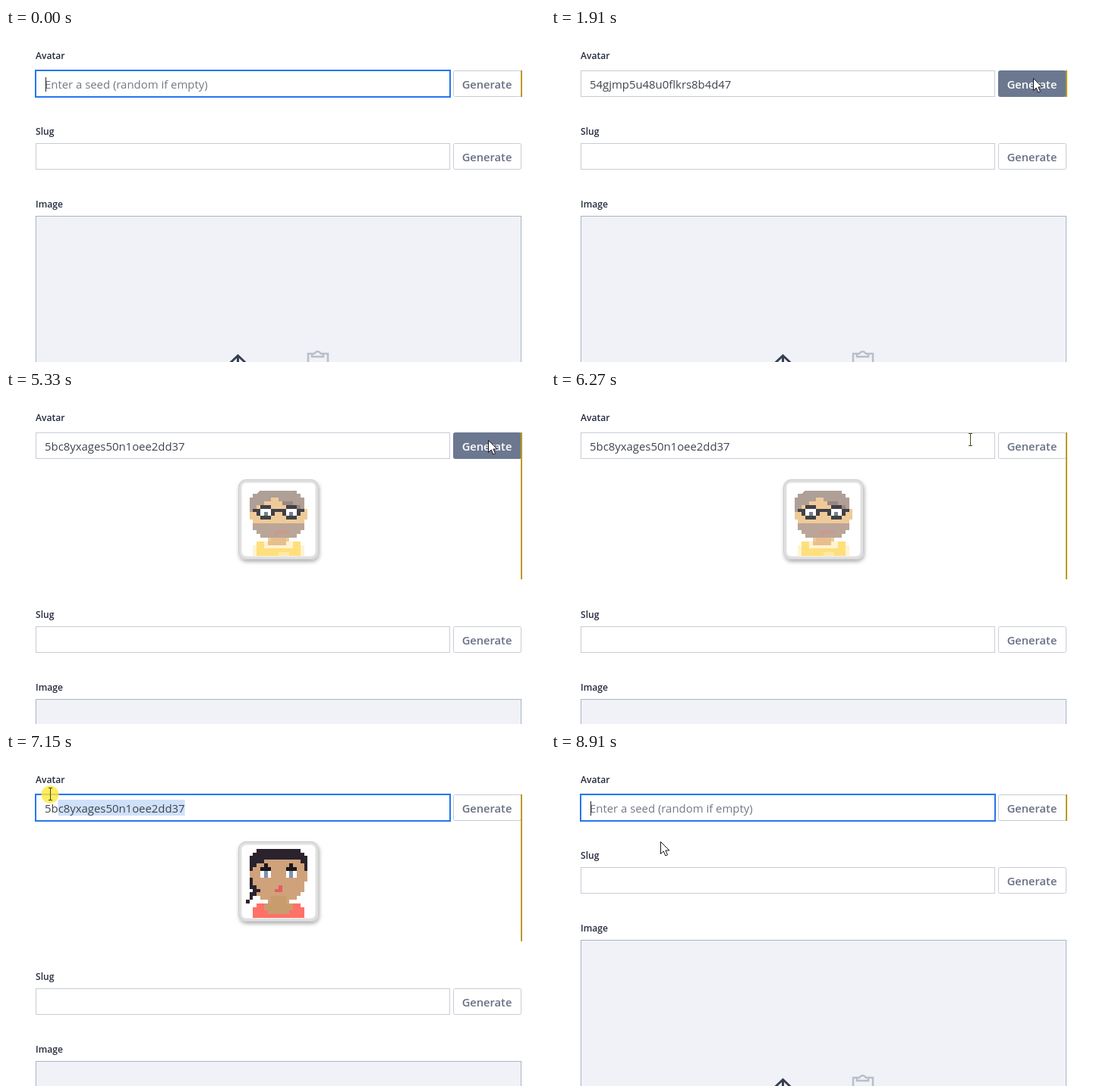
Write an HTML page that moves like this. It is 710 px wide and 441 px high and loops after 9.04 s.

```html
<!DOCTYPE html>
<html lang="en">
<head>
<meta charset="utf-8">
<title>Avatar field</title>
<style>
html, body { margin: 0; width: 100%; height: 100%; overflow: hidden; background: #fff; }
svg { display: block; font-family: "Open Sans", "Noto Sans", sans-serif; }
.label { font-size: 12.1px; font-weight: 600; fill: #262b3f; }
.btn { font-size: 14.7px; font-weight: 600; fill: #697084; }
.seed { font-size: 14.9px; }
.box { fill: #fff; stroke: #c8ccd6; }
.pixels { shape-rendering: crispEdges; }
</style>
</head>
<body>
<svg width="710" height="441" viewBox="0 0 710 441">
  <defs>
    <filter id="shadow" x="-20%" y="-20%" width="140%" height="140%">
      <feDropShadow dx="1" dy="3" stdDeviation="2.5" flood-color="#000" flood-opacity=".3"/>
    </filter>
  </defs>
  <text class="label" x="39" y="41">Avatar</text>
  <rect id="field" class="box" x="39.5" y="56.5" width="545" height="34"/>
  <rect id="selection" y="63" height="21" fill="#cfe1fa"/>
  <text id="seed" class="seed" x="51" y="80"></text>
  <path id="caret" d="M52.5 65v19" stroke="#222"/>
  <rect id="button" class="box" x="589.5" y="56.5" width="89" height="34" rx="2"/>
  <text id="buttonText" class="btn" x="633.5" y="80" text-anchor="middle">Generate</text>
  <rect id="bar" x="678" y="56" width="2" fill="#bd9a20"/>

  <g id="card">
    <rect x="306" y="118" width="106" height="106" rx="10" fill="#e0e0e0" filter="url(#shadow)"/>
    <rect x="306.5" y="118.5" width="105" height="105" rx="10" fill="none" stroke="#cbcbcb"/>
    <rect x="310.5" y="122.5" width="97" height="97" rx="6" fill="#fff"/>
    <g id="face" class="pixels" transform="translate(311 123) scale(4.8)"></g>
  </g>

  <g id="rest">
    <text class="label" x="39" y="141">Slug</text>
    <rect class="box" x="39.5" y="152.5" width="545" height="34"/>
    <rect class="box" x="589.5" y="152.5" width="89" height="34" rx="2"/>
    <text class="btn" x="633.5" y="176" text-anchor="middle">Generate</text>
    <text class="label" x="39" y="237">Image</text>
    <rect x="39.5" y="248.5" width="639" height="300" fill="#f0f2f7" stroke="#aab4c4"/>
    <path d="M295.5 442l10-9.5 10 9.5M305.5 433v20" fill="none" stroke="#374052" stroke-width="3"/>
    <path d="M403 430h-5v25M418 430h6v25M403 434v-4h3q4.500-6 9 0h3v4z" fill="none" stroke="#b9bec8" stroke-width="2.500"/>
  </g>

  <g id="pointer">
    <circle id="press" r="11.5" fill="#ffe83a" opacity=".8"/>
    <path id="arrow" d="M.5.5v16l3.700-3.500 2.600 6 2.700-1.200-2.600-5.800h5z" fill="#fff" stroke="#16161c"/>
    <path id="beam" d="M.5-8v15M-2-8.500h5M-2 7.500h5" fill="none" stroke="#4a4520"/>
  </g>
</svg>
<script>
const LOOP = 9040;
const $ = id => document.getElementById(id);
const set = (id, attrs) => { for (const k in attrs) $(id).setAttribute(k, attrs[k]); };
const show = (id, on) => { $(id).style.display = on ? "" : "none"; };
const within = (t, from, to) => t >= from && t < to;

// Faces on a 20 by 20 grid: colour, then path
const head = "M4 3h12v2h1v2h1v3h-1v3h-1v1h-1v1h-2v2h-6v-2h-2v-1h-1v-1h-1v-3h-1v-3h1v-2h1z";
const eyes = "M5 7h3v2h-3zM12 7h3v2h-3z";
const brows = "M5 6h1v-1h1v1h1v1h-3zM12 6h1v-1h1v1h1v1h-3z";
const beard = "M3 10h1v1h1v1h10v-1h1v-1h1v3h-1v1h-1v1h-10v-1h-1v-1h-1z";
const torso = "M4 16h12v1h1v3h-14v-3h1z";

const bearded = [
  ["#ffdfb5", head],
  ["#4b3e3e", "M4 2h3v1h-2v1h-1v2h-2v-2h1v-1h1zM8 2h8v1h1v1h1v2h-2v-2h-1v-1h-2v1h-2v-1h-3z"],
  ["#2b2424", brows],
  ["#fff", eyes],
  ["#697f99", "M7 8h1v1h-1zM14 8h1v1h-1z"],
  ["#4b3e3e", beard],
  ["#e9a9a9", "M8 13h3v1h-3z"],
  ["#7d7776", torso],
  ["#ffdfb5", "M8 15h4v2h-4z"],
  ["#5a5352", "M7 15h1v2h4v-2h1v3h-2v2h-2v-2h-2z"]
];
const glasses = [
  ["#efca99", head],
  ["#b09f96", "M5 2h10v1h1v1h1v4h-1v-1h-2v-1h-2v-1h-2v-1h-2v1h-2v1h-2v1h-1v1h-1v-4h1v-1h1z"],
  ["#99877f", "M11 5h3v1h2v1h1v1h-1v-1h-2v-1h-3z"],
  ["#baa598", "M3 11h14v2h-1v1h-1v1h-10v-1h-1v-1h-1z"],
  ["#c79c8f", "M9 13h4v1h-3v.5h-1z"],
  ["#fff", eyes],
  ["#78828c", "M6 8h1v1h-1zM13 8h1v1h-1z"],
  ["#3f4147", "M3 7h2v-1h3v1h4v-1h3v1h2v1h-1v1h-1v1h-3v-1h-1v-1h-2v1h-1v1h-3v-1h-1v-1h-1zM5 7v2h3v-2zM12 7v2h3v-2z"],
  ["#fff3d2", torso],
  ["#ffdf7c", "M4 16h2v2h8v-2h2v4h-12z"],
  ["#e6bf8c", "M8 15h4v2h-5v-1h1z"],
  ["#ffeaa5", "M10 19h3v1h-3z"]
];
const braid = [
  ["#cfa27b", head],
  ["#2a222d", "M4 1h12v1h1v1h1v4h-1v-2h-1v-1h-10v1h-2v1h-1v1h-1v-4h1v-1h1z"],
  ["#2a222d", "M2 9h1v2h1v1h1v1h-1v1h-1v1h-1v-2h1v-1h-1zM1 15h1v1h-1z"],
  ["#1b171c", brows],
  ["#fff", eyes],
  ["#7e93ad", "M6 7h1v2h-1zM13 7h1v2h-1z"],
  ["#e55e63", "M10 11h1v2h-2v-1h1z"],
  ["#ff7068", torso],
  ["#c99c6e", "M8 14h4v2h2v2h-1v1h-6v-1h-1v-2h2z"],
  ["#fff", "M2.900 16h1v1h-1zM16 16h1v1h-1z"]
];

// Each entry holds from its time on
const seeds = [[0, ""], [1910, "54gjmp5u48u0flkrs8b4d47"], [3480, "x7ee2bo78qqlrec81w3uu"],
  [5330, "5bc8yxages50n1oee2dd37"], [8910, ""]];
const faces = [[0, null], [3480, bearded], [5330, glasses], [6700, braid], [8910, null]];
const presses = [[1350, 1450], [3150, 3250], [5020, 5150], [6700, 7560]];
const path = [[460, 655, -20], [790, 648, 40], [940, 648, 40], [1120, 635, 66], [6170, 635, 66],
  [6650, 240, 64], [6700, 239, 64], [6820, 221, 64], [7070, 70, 60], [7300, 37, 48],
  [7480, 34, 46], [7560, 33, 46], [8070, 33, 46], [8350, 144, 118], [LOOP, 144, 118]];

const at = (list, t) => list.filter(e => e[0] <= t).pop()[1];

function pointerAt(t) {
  const i = Math.max(1, path.findIndex(p => p[0] > t));
  const [t0, x0, y0] = path[i - 1], [t1, x1, y1] = path[i];
  const k = Math.max(0, (t - t0) / (t1 - t0));
  return [x0 + (x1 - x0) * k, y0 + (y1 - y0) * k];
}

let drawn = null;
function drawFace(face) {
  if (face === drawn) return;
  drawn = face;
  $("face").innerHTML = (face || []).map(([c, d]) => `<path fill="${c}" fill-rule="evenodd" d="${d}"/>`).join("");
}

function drawSelection(t, seed, x) {
  const on = within(t, 6700, 8910);
  show("selection", on);
  if (!on) return;
  const text = $("seed"), edge = t < 7560 ? x + 3 : 0;
  const end = text.getEndPositionOfChar(seed.length - 1).x;
  let start = end;
  for (let i = seed.length - 1; i >= 0; i--) {
    const left = text.getStartPositionOfChar(i).x;
    if (left >= edge) start = left;
  }
  set("selection", { x: start, width: end - start });
}

function draw(t) {
  const [x, y] = pointerAt(t), seed = at(seeds, t), face = at(faces, t);
  const focused = t < 1350 || t >= 6700;
  const hover = t >= 460 && x > 589 && y > 56 && y < 91;
  const dragging = within(t, 6700, 7560);
  const overField = dragging || x > 39 && x < 585 && y > 56 && y < 91;

  $("field").style.cssText = focused ? "stroke:#2477ee;stroke-width:2" : "";
  set("field", focused ? { x: 39, y: 56, width: 546, height: 35 } : { x: 39.5, y: 56.5, width: 545, height: 34 });
  $("seed").textContent = seed || "Enter a seed (random if empty)";
  set("seed", { fill: seed ? "#3f444d" : "#737984" });
  show("caret", focused && !seed);
  drawSelection(t, seed, x);

  $("button").style.cssText = hover ? "fill:#6b7890;stroke:#6b7890" : "";
  $("buttonText").style.fill = hover ? "#fff" : "";

  show("card", face);
  drawFace(face);
  set("bar", { height: face ? 194 : 35 });
  set("rest", { transform: `translate(0 ${face ? 160 : 0})` });

  show("pointer", t >= 460);
  set("pointer", { transform: `translate(${Math.round(x)} ${Math.round(y)})` });
  show("press", presses.some(([a, b]) => within(t, a, b)));
  show("arrow", !overField);
  show("beam", overField);
}

const began = performance.now();
function tick() {
  draw((performance.now() - began) % LOOP);
  requestAnimationFrame(tick);
}
tick();
</script>
</body>
</html>
```
